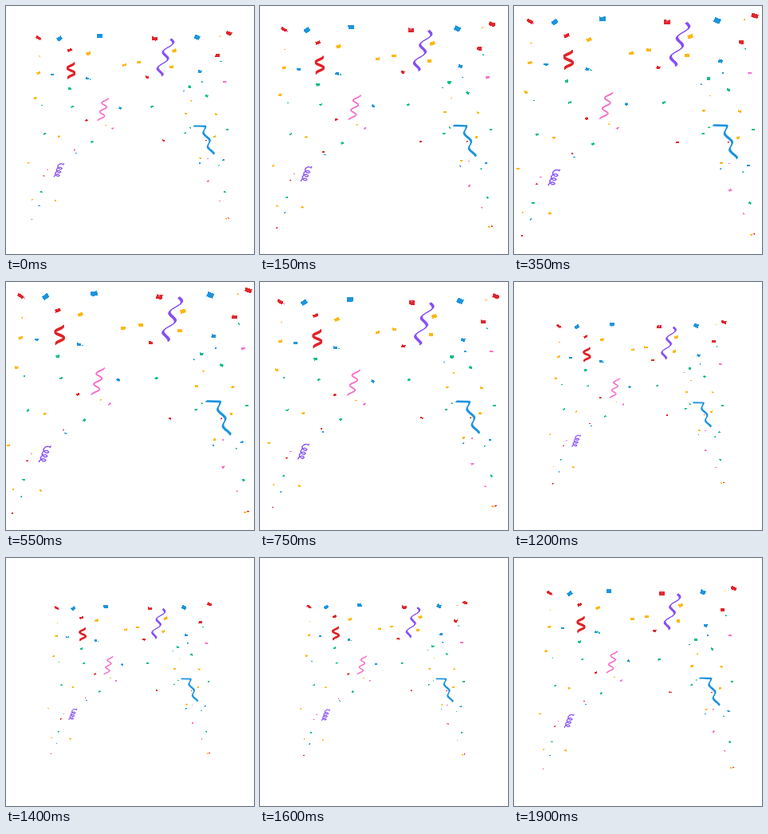
These frames come from a looping animation (311x311 px, 1950 ms). An HTML page:

```html
<!DOCTYPE html>
<html lang="en">
<head>
<meta charset="utf-8">
<title>Confetti</title>
<style>
  html, body { margin: 0; width: 100%; height: 100%; overflow: hidden; background: #fff; }
  svg { display: block; width: 100vw; height: 100vh; }
</style>
</head>
<body>
<svg viewBox="0 0 311 311" shape-rendering="crispEdges"><g id="burst"></g></svg>
<script>
const LOOP = 1950, STEP = 50, CENTER = 155.6, SWING = 0.2;
const DRAWN_SCALE = 1.181; // the swing value at which the layout below is written
const RED = '#e2252a', BLUE = '#1c94de', GREEN = '#0cbd8a', YELLOW = '#fdb70d',
  PINK = '#fb70ca', VIOLET = '#8750f5';
const burst = document.getElementById('burst');

function addPath(attrs) {
  const path = document.createElementNS('http://www.w3.org/2000/svg', 'path');
  for (const key in attrs) path.setAttribute(key, attrs[key]);
  burst.append(path);
}

let seed = 7;
function random(low, high) {
  seed = (seed * 16807) % 2147483647;
  return low + (high - low) * seed / 2147483647;
}

function addPiece(color, x, y, size) {
  const w = size / 2, h = w * random(0.5, 0.8), bend = h * 0.3;
  addPath({
    d: `M${-w} ${-h}Q0 ${bend - h} ${w} ${-h}V${h}Q0 ${h + bend} ${-w} ${h}z`,
    fill: color,
    transform: `translate(${x} ${y}) rotate(${random(-38, 38)})`
  });
}

// Main pieces, larger towards the top
const clusters = {
  [RED]: '20,19 66,37 192,20 302,12 285,45 181,77 91,141 205,171',
  [BLUE]: '51,20 111,16 255,18 40,73 259,69 92,79 141,123 294,200',
  [GREEN]: '66,94 70,121 188,121 244,91 269,105 237,160 300,155 29,161 99,173 24,247 296,247',
  [YELLOW]: '94,42 20,71 147,59 169,55 221,38 217,62 15,108 238,131 283,132 281,165 50,165 260,197 5,204 45,260 298,287',
  [PINK]: '296,84 130,153 271,231'
};
for (const color in clusters) {
  for (const spot of clusters[color].split(' ')) {
    const [x, y] = spot.split(',').map(Number);
    addPiece(color, x, y, 3.2 + 6.5 * Math.exp(-y / 60));
  }
}

// Specks fill an arch that opens downwards
const speckColors = [BLUE, GREEN, YELLOW, PINK, RED];
for (let i = 0; i < 26; i++) {
  const side = i % 2 ? 1 : -1;
  const y = random(16, 290);
  const inner = Math.min(132, Math.max(0, 1.4 * (y - 140)));
  addPiece(speckColors[i % 5], CENTER + side * random(inner, 146), y, 2.2);
}

// A wave from one point to another, drawn with a slanted flat pen
function addStreamer({ color, from, to, turns, swing, pen, phase = Math.PI / 2, loop = 0, lead }) {
  const points = lead ? [lead] : [];
  const count = 60;
  for (let i = 0; i <= count; i++) {
    const u = i / count, angle = phase + 2 * Math.PI * turns * u;
    points.push([
      from[0] + (to[0] - from[0]) * u + swing * Math.sin(angle),
      from[1] + (to[1] - from[1]) * u + loop * Math.cos(angle)
    ]);
  }
  const shift = ([x, y], k) => `${(x + pen[0] * k).toFixed(2)} ${(y + pen[1] * k).toFixed(2)}`;
  let d = '';
  for (let i = 1; i < points.length; i++) {
    const a = points[i - 1], b = points[i];
    d += `M${shift(a, -0.5)}L${shift(b, -0.5)}L${shift(b, 0.5)}L${shift(a, 0.5)}z`;
  }
  addPath({ d, fill: color, stroke: color, 'stroke-width': 0.9, 'stroke-linejoin': 'round' });
}

addStreamer({ color: VIOLET, from: [216, 21], to: [198, 75], turns: 2.25, swing: 5.5, pen: [2.4, -1.6], phase: 0 });
addStreamer({ color: BLUE, from: [264, 150], to: [277, 191], turns: 2, swing: 3, pen: [1.5, -1.7], lead: [250, 149.5] });
addStreamer({ color: RED, from: [67.5, 56.5], to: [69, 78.5], turns: 1.5, swing: 5.5, pen: [0, 3] });
addStreamer({ color: PINK, from: [119.5, 108.5], to: [112, 141.5], turns: 2.5, swing: 4.3, pen: [0, 1.2] });
addStreamer({ color: VIOLET, from: [53, 207], to: [46.5, 225], turns: 3.5, swing: 3.5, pen: [0.4, 0.4], loop: 2.6, lead: [57.5, 205] });

function render(ms) {
  const t = Math.floor((ms % LOOP) / STEP) * STEP;
  const scale = (1 + SWING * Math.sin(2 * Math.PI * t / LOOP)) / DRAWN_SCALE;
  burst.setAttribute('transform',
    `translate(${CENTER} ${CENTER}) scale(${scale}) translate(${-CENTER} ${-CENTER})`);
}

const start = performance.now();
function tick(now) {
  render(Math.max(0, now - start));
  requestAnimationFrame(tick);
}
render(0);
requestAnimationFrame(tick);
</script>
</body>
</html>
```
